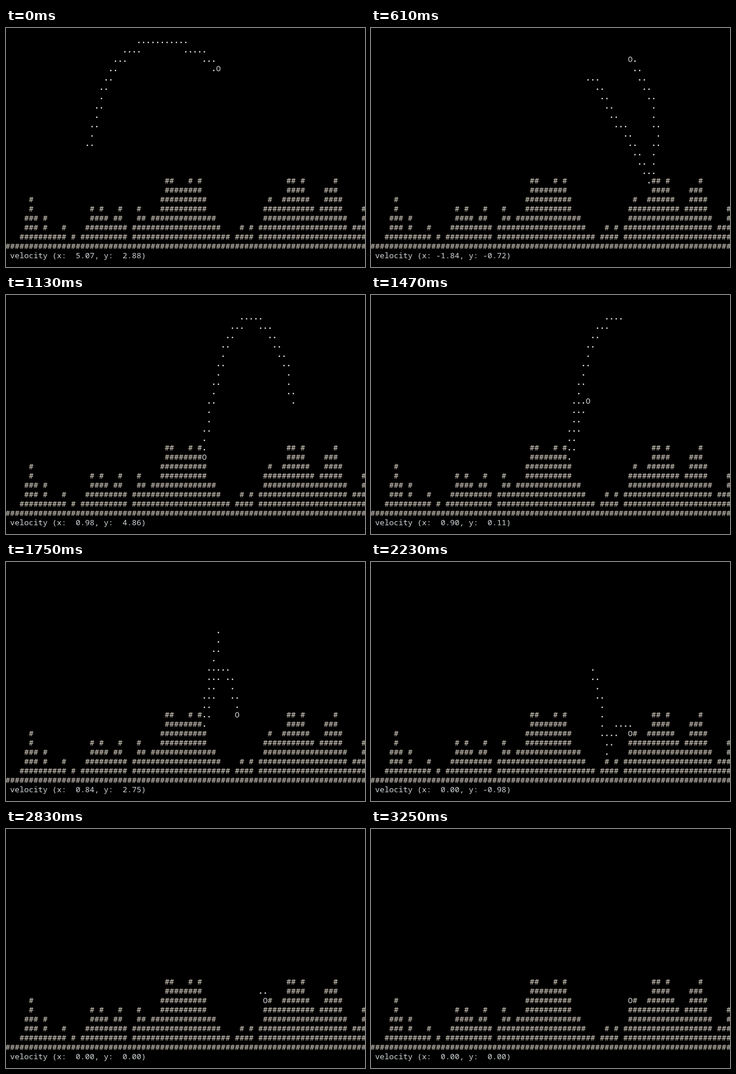
Recreate the animation shown at these times as an HTML page. Size 613 by 409 pixels, loop 3.39 s.

```html
<!DOCTYPE html>
<html lang="en">
<head>
<meta charset="utf-8">
<title>Bouncing ball</title>
<style>
  html, body { margin: 0; width: 100%; height: 100%; overflow: hidden; background: #000; }
  pre {
    position: absolute; left: -1px; top: -3px; margin: 0;
    font: 13.3333px/16px "Noto Sans Mono", "DejaVu Sans Mono", monospace;
    font-variant-ligatures: none;
  }
  #land { top: 253px; color: #e4dccf; }
  #trail { color: #e6e6e6; font-weight: 700; }
  #ball { color: #d8dadc; }
  #status { top: 381px; color: #d0d6d9; }
</style>
</head>
<body>
<pre id="land">
                                  ##   # #                  ## #      #
                                  ########                  ####    ###
     #                           ##########             #  ######   ####
     #            # #   #   #    ##########            ########### #####    #
    ### #         #### ##   ## ##############          ##################   #
    ### #   #    ######### ###################    # # ################### ###
   ########## # ########## ##################### #### #######################
#############################################################################
</pre>
<pre id="trail"></pre>
<pre id="ball"></pre>
<pre id="status"></pre>
<script>
const LOOP = 3390, TICK = 60, COLS = 77, ROWS = 24;
const START = { until: -10, to: [17, 13], v: [1, -5] };
const FINE = 4;          // path samples per tick
const MAX_AGE = 13;      // trail lifetime in ticks
const MAX_DOTS = 45;
const REBOUND = -0.7;

// Each flight is a parabola: end tick, control point, end point, final velocity
const flights = [
  { until: 0, via: [22.2, -5], to: [45, 4], v: [5.07, 2.88] },
  { until: 4, via: [52, 9], to: [59, 16], v: [5, 5.4] },
  { until: 10, via: [63.5, 8], to: [55, 3], v: [-1.84, -0.72], bounce: true },
  { until: 19, via: [46, -1], to: [42, 17], v: [0.98, 4.86] },
  { until: 24, via: [44, 11], to: [46, 11], v: [0.9, 0.11], bounce: true },
  { until: 31, via: [48, 11], to: [50, 20], v: [0.82, 3.8] },
  { until: 36, via: [52, 15], to: [55, 18], v: [0, 1.68], bounce: true },
  { until: 42, via: [55, 18], to: [55, 18], v: [0, 0], bounce: true }
];

const mix = (a, b, u) => a.map((n, i) => n + (b[i] - n) * u);

function stateAt(k) {
  const found = flights.findIndex(f => k <= f.until);
  const i = found < 0 ? flights.length - 1 : found;
  const to = flights[i], from = flights[i - 1] || START;
  const u = Math.min(1, (k - from.until) / (to.until - from.until));
  const v0 = [from.v[0], from.v[1] * (to.bounce ? REBOUND : 1)];
  const pos = mix(mix(from.to, to.via, u), mix(to.via, to.to, u), u);
  return { cell: pos.map(Math.round), v: mix(v0, to.v, u) };
}

// Cells passed up to tick k; the ball moves sideways first, then up or down
function trailAt(k) {
  const cells = [];
  let [x, y] = START.to;
  for (let j = START.until * FINE; j < k * FINE; j++) {
    const [nx, ny] = stateAt(j / FINE).cell;
    const old = j / FINE < k - MAX_AGE;
    if (nx !== x && !old) cells.push([nx, y]);
    if (ny !== y && !old) cells.push([nx, ny]);
    [x, y] = [nx, ny];
  }
  return cells.slice(-MAX_DOTS);
}

function show(id, cells, mark) {
  const grid = Array.from({ length: ROWS }, () => Array(COLS).fill(" "));
  for (const [x, y] of cells) grid[y][x] = mark;
  document.getElementById(id).textContent = grid.map(row => row.join("")).join("\n");
}

const num = n => n.toFixed(2).padStart(5);

let shown = -1;
function frame() {
  const t = performance.now() % LOOP;
  const k = Math.floor((t + 20) / TICK);
  if (k !== shown) {
    shown = k;
    const { cell, v } = stateAt(k);
    const dots = trailAt(k).filter(([x, y]) => x !== cell[0] || y !== cell[1]);
    show("trail", dots, ".");
    show("ball", [cell], "O");
    document.getElementById("status").textContent =
      ` velocity (x: ${num(v[0])}, y: ${num(v[1])})`;
  }
  requestAnimationFrame(frame);
}
frame();
</script>
</body>
</html>
```
